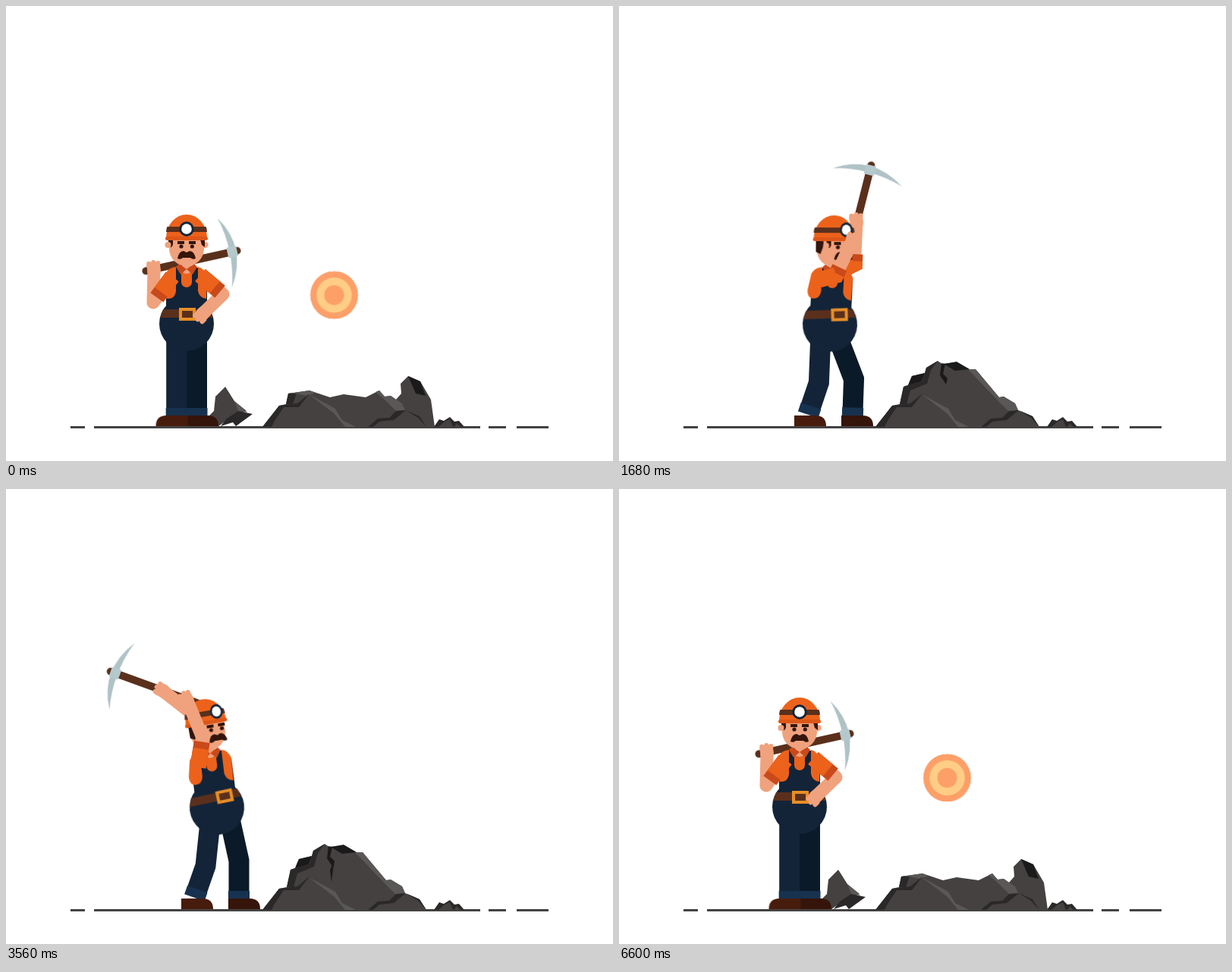
Animation, 800 px wide and 600 px high, one loop 7280 ms. Source, as an HTML page without scripts:

```html
<!DOCTYPE html>
<html lang="en">
<head>
<meta charset="utf-8">
<title>Miner</title>
<style>
@property --turn { syntax: "<number>"; inherits: true; initial-value: 0; }
html, body { margin: 0; width: 100%; height: 100%; overflow: hidden; background: #fff; }
svg { display: block; width: 100%; height: 100%; }
svg * { animation-duration: 7.28s; animation-timing-function: linear; animation-iteration-count: infinite; }

.orange { fill: #ec621b; }
.rust { fill: #c9491a; }
.skin { fill: #efa27d; }
.navy { fill: #132438; }
.brown { fill: #5a301c; }
.hair { fill: #35150b; }
.rock { fill: #444140; }
.shade { fill: #2a2828; }
.black { fill: #1b1a1a; }
.light { fill: #5a5757; }

/* Turn of the head: 1 looks at the rock, 0 looks at the viewer */
.miner { animation-name: turn; }
@keyframes turn {
  0%, .54%, 70%, 100% { --turn: 0; }
  .55%, 64% { --turn: 1; }
}
.head { rotate: calc(var(--turn) * -3deg); transform-origin: 0 -100px; }
.face { translate: calc(var(--turn) * 12px); }
.lamp { translate: calc(var(--turn) * 16px); scale: calc(1 - var(--turn) * .14) 1; }
.ear { translate: calc(var(--turn) * 14px); }
.frontal { opacity: calc(1 - var(--turn)); }
.profile { opacity: var(--turn); }
.belt { rotate: calc(var(--turn) * -5deg); }
.buckle { translate: calc(var(--turn) * 12px); }

.body { animation-name: body; }
@keyframes body {
  0%, .54%, 82.14%, 100% { transform: translate(238px,419px) rotate(0deg); }
  .55%, 12.5%, 20.88%, 33.38%, 41.76%, 54.26% { transform: translate(278px,420px) rotate(6deg); }
  4.67%, 11.68%, 25.55%, 32.55%, 46.43%, 53.43% { transform: translate(278px,420px) rotate(0deg); }
  7.14%, 28.02%, 48.9% { transform: translate(278px,420px) rotate(-7deg); }
  10.44%, 31.32%, 52.2% { transform: translate(278px,420px) rotate(-4deg); }
  13.19%, 16.21%, 34.07%, 37.09%, 54.95% { transform: translate(278px,421px) rotate(16deg); }
  56.3%, 62.64% { transform: translate(278px,421px) rotate(25.5deg); }
  67.86% { transform: translate(272px,420px) rotate(9deg); }
  73.08% { transform: translate(261px,420px) rotate(4.8deg); }
  75% { transform: translate(256px,420px) rotate(4deg); }
  78.57% { transform: translate(243px,419px) rotate(1deg); }
}

.pick { animation-name: pick; }
@keyframes pick {
  0%, .54% { transform: translate(202px,345.5px) rotate(-12.5deg); }
  .55%, 12.5%, 20.88%, 33.38%, 41.76%, 54.26% { transform: translate(335px,345px) rotate(-45deg); }
  4.67%, 11.68%, 25.55%, 32.55%, 46.43%, 53.43% { transform: translate(275px,275px) rotate(-110deg); }
  7.14%, 28.02%, 48.9% { transform: translate(236.5px,276.5px) rotate(-160deg); }
  10.44%, 31.32%, 52.2% { transform: translate(232px,278px) rotate(-164deg); }
  13.19%, 16.21%, 34.07%, 37.09%, 54.95% { transform: translate(340px,427px) rotate(.5deg); }
  56.3%, 62.64% { transform: translate(357px,444px) rotate(16deg); }
  67.86% { transform: translate(250px,428px) rotate(92deg); }
  73.08% { transform: translate(159px,400px) rotate(168.5deg); }
  75% { transform: translate(150px,390px) rotate(180deg); }
  78.57% { transform: translate(180px,306px) rotate(265deg); }
  82.14%, 100% { transform: translate(202px,345.5px) rotate(347.5deg); }
}

/* Limbs are thick polylines; sleeve and cuff are dashes of the same line */
.arm path, .leg { fill: none; }
.arm .flesh { stroke: #efa27d; stroke-width: 17; stroke-linejoin: round; marker-end: url(#hand); }
.arm .cuff { stroke: #c9491a; stroke-width: 21; stroke-dasharray: 34 999; }
.arm .sleeve { stroke: #ec621b; stroke-width: 21; stroke-dasharray: 25 999; }
.near path { animation-name: near; }
@keyframes near {
  0%, .54%, 82.14%, 100% { d: path("M219 357L194 391L195 349"); }
  .55%, 12.5%, 20.88%, 33.38%, 41.76%, 54.26% { d: path("M268 360L293 385L335 345"); }
  4.67%, 11.68%, 25.55%, 32.55%, 46.43%, 53.43% { d: path("M260 362L278 322L275 275"); }
  7.14%, 28.02%, 48.9% { d: path("M253 367L259 328L239 279"); }
  10.44%, 31.32%, 52.2% { d: path("M255 366L259 326L235 280"); }
  13.19%, 16.21%, 34.07%, 37.09%, 54.95% { d: path("M277 362L293 394L339 428"); }
  56.3%, 62.64% { d: path("M285 362L308 391L355 442"); }
  67.86% { d: path("M264 360L252 394L250 428"); }
  73.08% { d: path("M246 356L206 372L163 399"); }
  75% { d: path("M240 357L198 373L153 391"); }
  78.57% { d: path("M225 357L190 350L181 308"); }
}
.far path { animation-name: far; }
@keyframes far {
  0%, .54%, 82.14%, 100% { d: path("M256 355L286 380L260 405"); }
  .55%, 12.5%, 20.88%, 33.38%, 41.76%, 54.26% { d: path("M298 358L325 376L357 323"); }
  4.67%, 11.68%, 25.55%, 32.55%, 46.43%, 53.43% { d: path("M284 340L294 300L264 245"); }
  7.14%, 28.02%, 48.9% { d: path("M276 336L255 304L208 267"); }
  10.44%, 31.32%, 52.2% { d: path("M280 336L258 304L201 269"); }
  13.19%, 16.21%, 34.07%, 37.09%, 54.95% { d: path("M309 362L323 396L370 426"); }
  56.3%, 62.64% { d: path("M322 370L342 402L385 452"); }
  67.86% { d: path("M294 358L317 388L278 414"); }
  73.08% { d: path("M284 356L315 383L269 413"); }
  75% { d: path("M279 356L309 382L265 411"); }
  78.57% { d: path("M262 355L292 380L260 406"); }
}

.leg { stroke-width: 27; }
.leg.l { stroke: #132438; marker-end: url(#hem); animation-name: legL; }
.leg.r { stroke: #0b1a28; marker-end: url(#hem); animation-name: legR; }
@keyframes legL {
  0%, .54%, 82.14%, 100% { d: path("M224.7 430L224.7 490L224.7 540"); }
  .55%, 13.19%, 16.21%, 34.07%, 37.09%, 54.95%, 64% { d: path("M261 440L264 496L251 537"); }
  7.14%, 28.02%, 48.9% { d: path("M269 440L263 497L249 537"); }
  10.44%, 31.32%, 52.2% { d: path("M267 440L262 497L249 537"); }
  65.93% { d: path("M256 440L246 486L235 531"); }
  67.86% { d: path("M251 440L234 490L226 538"); }
  73.08% { d: path("M244 440L231 490L226 540"); }
}
@keyframes legR {
  0%, .54%, 82.14%, 100% { d: path("M251.5 430L251.5 490L251.5 540"); }
  .55%, 13.19%, 16.21%, 34.07%, 37.09%, 54.95%, 69% { d: path("M283 446L313 495L309 539"); }
  7.14%, 28.02%, 48.9% { d: path("M296 440L307 490L307 540"); }
  10.44%, 31.32%, 52.2% { d: path("M296 440L308 490L308 540"); }
  73.08% { d: path("M274 440L300 487L287 529"); }
  77% { d: path("M255 440L263 488L253 538"); }
}
.bootL { animation-name: bootL; }
.bootL path { transform-box: fill-box; transform-origin: center; animation-name: flip; animation-timing-function: step-end; }
.bootR { animation-name: bootR; }
@keyframes bootL {
  0%, .54%, 67.86%, 100% { transform: translate(197.5px,540px); }
  .55%, 64% { transform: translate(231px,540px); }
  65.93% { transform: translate(214px,533px); }
}
@keyframes flip { 0%, 65.93%, 100% { scale: -1 1; } .55% { scale: 1 1; } }
@keyframes bootR {
  0%, .54%, 77%, 100% { transform: translate(238px,540px) rotate(0deg); }
  .55%, 69% { transform: translate(293px,540px) rotate(0deg); }
  73.08% { transform: translate(274px,526px) rotate(24deg); }
}
.eyes { transform-box: fill-box; transform-origin: center; animation-name: blink; }
@keyframes blink {
  0%, 12.6%, 16.5%, 33.5%, 37.4%, 54.4%, 57.8%, 100% { scale: 1 1; }
  13.2%, 15.5%, 34.1%, 36.4%, 55%, 57% { scale: 1 .25; }
}

/* Rock states switch at the strikes */
.whole, .broken, .crack1, .crack2 { animation-timing-function: step-end; }
.whole { animation-name: whole; }
.broken { animation-name: broken; }
.crack1 { animation-name: crack1; }
.crack2 { animation-name: crack2; }
@keyframes whole { 0%, 54.95%, 100% { opacity: 0; } .55% { opacity: 1; } }
@keyframes broken { 0%, 54.95%, 100% { opacity: 1; } .55% { opacity: 0; } }
@keyframes crack1 { 0%, 100% { opacity: 0; } 13.19% { opacity: 1; } }
@keyframes crack2 { 0%, 100% { opacity: 0; } 34.07% { opacity: 1; } }
.chunk { animation-name: chunk; }
@keyframes chunk { 54.95% { translate: 90px -10px; } 57.5%, 100% { translate: 0 0; } }
.ground { stroke: #454242; stroke-width: 3; animation-name: shake; animation-timing-function: step-end; }
@keyframes shake {
  0%, 13.74%, 34.62%, 55.5%, 100% { translate: 0 0; }
  13.19%, 34.07%, 54.95% { translate: 0 1px; }
}

.debris > * { animation-name: debris; }
@keyframes debris {
  0%, 13.19%, 34.07%, 54.95% { translate: 429px 472px; rotate: -40deg; scale: 0; }
  14.29%, 35.16%, 56.04% { translate: var(--a); rotate: 0deg; scale: 1; }
  15.93%, 36.81%, 57.69% { translate: var(--b); rotate: 60deg; scale: 1; }
  17.58%, 38.46%, 59.34% { translate: var(--c); rotate: 120deg; scale: 1; }
  19.78%, 40.66%, 61.54%, 100% { translate: var(--d); rotate: 200deg; scale: 0; }
}

.coin { animation-name: rise; }
@keyframes rise {
  0%, .54%, 100% { translate: 432.5px 381.2px; }
  54.95% { translate: 432.5px 520px; animation-timing-function: ease-out; }
  59.34% { translate: 432.5px 362px; animation-timing-function: ease-out; }
  61.5% { translate: 432.5px 356px; animation-timing-function: ease-in-out; }
  69% { translate: 432.5px 380px; }
  76% { translate: 432.5px 380.4px; }
}
.spin { animation-name: spin; animation-timing-function: ease-in-out; }
.rim { animation-name: spin, rim; }
@keyframes spin {
  0%, 54.95%, 60.4%, 67%, 100% { scale: 1 1; }
  57.4%, 63.5% { scale: 1 -1; }
  59.34% { scale: 1 .63; }
}
@keyframes rim {
  0%, 54.95%, 57.4%, 60.4%, 63.5%, 67%, 100% { translate: 0 0; }
  56.2%, 58.7%, 62%, 65.2% { translate: 0 7px; }
  59.34% { translate: 0 6px; }
}
.shine { animation-name: shine; }
@keyframes shine {
  0%, 71.4% { transform: rotate(45deg) translateX(-46px); }
  73.08% { transform: rotate(45deg) translateX(-23px); }
  78%, 100% { transform: rotate(45deg) translateX(46px); }
}
</style>
</head>
<body>
<svg viewBox="0 0 800 600">
  <defs>
    <marker id="hand" markerUnits="userSpaceOnUse" markerWidth="40" markerHeight="40" viewBox="-20 -20 40 40" orient="auto">
      <g class="skin">
        <ellipse cx="1" rx="11" ry="9"/>
        <rect x="2" y="-10" width="10" height="6" rx="3"/>
        <rect x="3" y="-4" width="11" height="6" rx="3"/>
        <rect x="2" y="2" width="11" height="6" rx="3"/>
      </g>
    </marker>
    <marker id="hem" markerUnits="userSpaceOnUse" markerWidth="40" markerHeight="40" viewBox="-20 -20 40 40" orient="auto">
      <rect x="-10" y="-14" width="12" height="28" fill="#17324f"/>
    </marker>
    <clipPath id="disc"><circle r="31.3"/></clipPath>
    <path id="boot" d="M0 0H28Q42 0 42 14H0z"/>
  </defs>

  <g class="broken">
    <g class="coin">
      <circle class="spin rim" r="31.3" fill="#e07d4c"/>
      <g class="spin">
        <circle r="31.3" fill="#fd9f68"/>
        <circle r="23.3" fill="#ffcd86"/>
        <circle r="13" fill="#fd9f68"/>
      </g>
      <g clip-path="url(#disc)"><rect class="shine" x="-8" y="-40" width="16" height="80" fill="#fff" opacity=".38"/></g>
    </g>
    <g class="chunk">
      <path class="rock" d="M289 502L301 521L317 534L292 546L280 554L266 551L264 544L274 534L276 515z"/>
      <path class="shade" d="M306 534L325 538L303 554L299 549L283 554L291 544z"/>
      <path class="light" d="M301 521L318 536L306 534z"/>
    </g>
  </g>

  <path class="ground" d="M85 555.5H104M116 555.5H625M636 555.5H659M673 555.5H715"/>

  <g class="whole">
    <path class="rock" d="M338 555L360 527L370 525L375 502L381 500L386 488L403 484L405 477L420 468L426 472L445 470L462 479L470 479L501 516L507 515L522 524L526 533L545 541L554 555z"/>
    <path class="black" d="M381 500L386 488L403 484L399 495zM428 472L445 469L462 479L443 481z"/>
    <path class="shade" d="M370 525L375 502L381 500L400 495L405 477L420 468L411 480L406 498L384 507L379 525z"/>
    <path class="light" d="M460 479L470 479L501 516L507 515L522 524L526 533L514 535L500 521z"/>
    <path class="crack1 black" d="M425 471L430 472L427 485L433 491L431 499L423 487z"/>
    <path class="crack2 black" d="M427 485L433 491L431 502L429 518L427 503L430 495z"/>
  </g>
  <g class="broken">
    <path class="rock" d="M338 555L360 527L369 525L372 511L400 507L427 516L445 512L474 516L492 507L499 515L507 514L514 519L521 511L520 498L530 488L546 495L560 519L565 555z"/>
    <path class="shade" d="M369 525L372 511L383 510L378 525z"/>
    <path class="light" d="M372 511L400 507L408 510L396 514L383 511zM487 509L492 507L499 515L507 514L522 524L526 533L514 534L498 518z"/>
    <path class="black" d="M530 488L546 495L553 514L540 511z"/>
  </g>
  <path class="shade" d="M338 555L360 527L384 524L400 511L386 529L366 529L354 547L350 555z"/>
  <path class="light" d="M399 512L434 531L443 546L461 555H447L432 537z"/>
  <path class="shade" d="M477 555L490 544L505 543L514 534L527 533L511 546L492 548L484 555zM527 533L545 541L554 555L543 543zM564 555L571 545L577 547L585 542L591 548L597 547L604 555z"/>
  <path class="rock" d="M570 555L578 548L585 545L589 555zM591 555L594 550L599 555z"/>

  <g class="miner">
    <g class="pick">
      <path d="M-18 0H105" stroke="#5a301c" stroke-width="10" stroke-linecap="round"/>
      <path d="M89-48Q119-2 88 46Q102-2 89-48z" fill="#afc2c6"/>
      <rect x="92" y="-7" width="13" height="14" rx="2" fill="#b5c8cb"/>
    </g>
    <path class="leg r"/>
    <g class="bootR"><use href="#boot" fill="#35140a"/></g>
    <path class="leg l"/>
    <g class="bootL"><path d="M0 0H28Q42 0 42 14H0z" fill="#481c0d"/></g>

    <g class="body">
      <circle class="navy" r="36"/>
      <path class="navy" d="M-27 0V-62L-15-74H15L27-62V0z"/>
      <path class="orange" d="M-14-75V-43Q-15-33-25-33Q-32-34-32-44L-28-66Q-24-74-14-75z"/>
      <path class="orange" d="M15-75V-43Q17-34 26-33L27-62Q24-73 15-75z"/>
      <rect class="orange" x="-7" y="-76" width="14" height="28" rx="7"/>
      <rect class="skin" x="-6" y="-84" width="12" height="18" rx="5"/>
      <path class="rust" d="M-10-79L0-72L-8-65L-14-75zM10-79L0-72L8-65L14-75z"/>
      <g class="belt">
        <path class="brown" d="M-31-19H31L35-8H-35z"/>
        <rect class="buckle" x="-8" y="-19" width="18" height="13" fill="#5a301c" stroke="#e78e27" stroke-width="4"/>
      </g>
    </g>

    <g class="arm far"><path class="flesh"/><path class="cuff"/><path class="sleeve"/></g>

    <g class="body"><g class="head">
      <g class="frontal">
        <circle class="skin" cx="24.500" cy="-104" r="4"/>
      </g>
      <path class="skin" d="M-23-112V-99a23 23 0 0 0 46 0V-112z"/>
      <path class="hair frontal" d="M18-111H24V-101L20-104z"/>
      <path class="hair profile" d="M-24-111H-14V-104L-18-93L-24-96z"/>
      <g class="ear">
        <path class="hair" d="M-24-111H-18V-104L-20-101H-24z"/>
        <circle class="skin" cx="-24.500" cy="-104" r="4"/>
      </g>
      <g class="face hair">
        <path d="M-12-109H-3V-105H-12zM3-109H12V-105H3z"/>
        <g class="eyes"><circle cx="-7" cy="-102" r="2.600"/><circle cx="7.300" cy="-102" r="2.600"/></g>
        <path d="M-12-86Q-10-96-4-96L0-94L4-96Q10-96 12-86Q8-84 5-87H-5Q-8-84-12-86z"/>
      </g>
      <path class="orange" d="M-27-113a27 31 0 0 1 54 0z"/>
      <path class="brown" d="M-27-121q0-4 1.500-7h51q1.500 3 1.500 7z"/>
      <rect x="-28" y="-115" width="56" height="5" rx="2.500" fill="#dd5618"/>
      <g class="lamp"><circle class="navy" cy="-125" r="9.700"/><circle cy="-125" r="6.800" fill="#fff"/></g>
    </g></g>

    <g class="arm near"><path class="flesh"/><path class="cuff"/><path class="sleeve"/></g>
  </g>

  <g class="debris">
    <path class="rock" d="M-4 3L1-5L4-4L0 5z" style="--a:452px 394px;--b:484px 388px;--c:513px 423px;--d:540px 510px"/>
    <path class="rock" d="M-4 0L4-2V1L-4 2z" style="--a:488px 420px;--b:533px 421px;--c:571px 471px;--d:598px 550px"/>
    <path class="black" d="M-4-3L2-3L4 2L0 4z" style="--a:488px 467px;--b:522px 482px;--c:548px 531px;--d:556px 552px"/>
    <path class="black" d="M-4 0L3-2L3 1L-3 2z" style="--a:397px 443px;--b:375px 459px;--c:356px 519px;--d:348px 553px"/>
    <path class="light" d="M-5-1L2-2L5 1L-2 2z" style="--a:373px 429px;--b:355px 478px;--c:349px 553px;--d:347px 555px"/>
  </g>
</svg>
</body>
</html>
```
